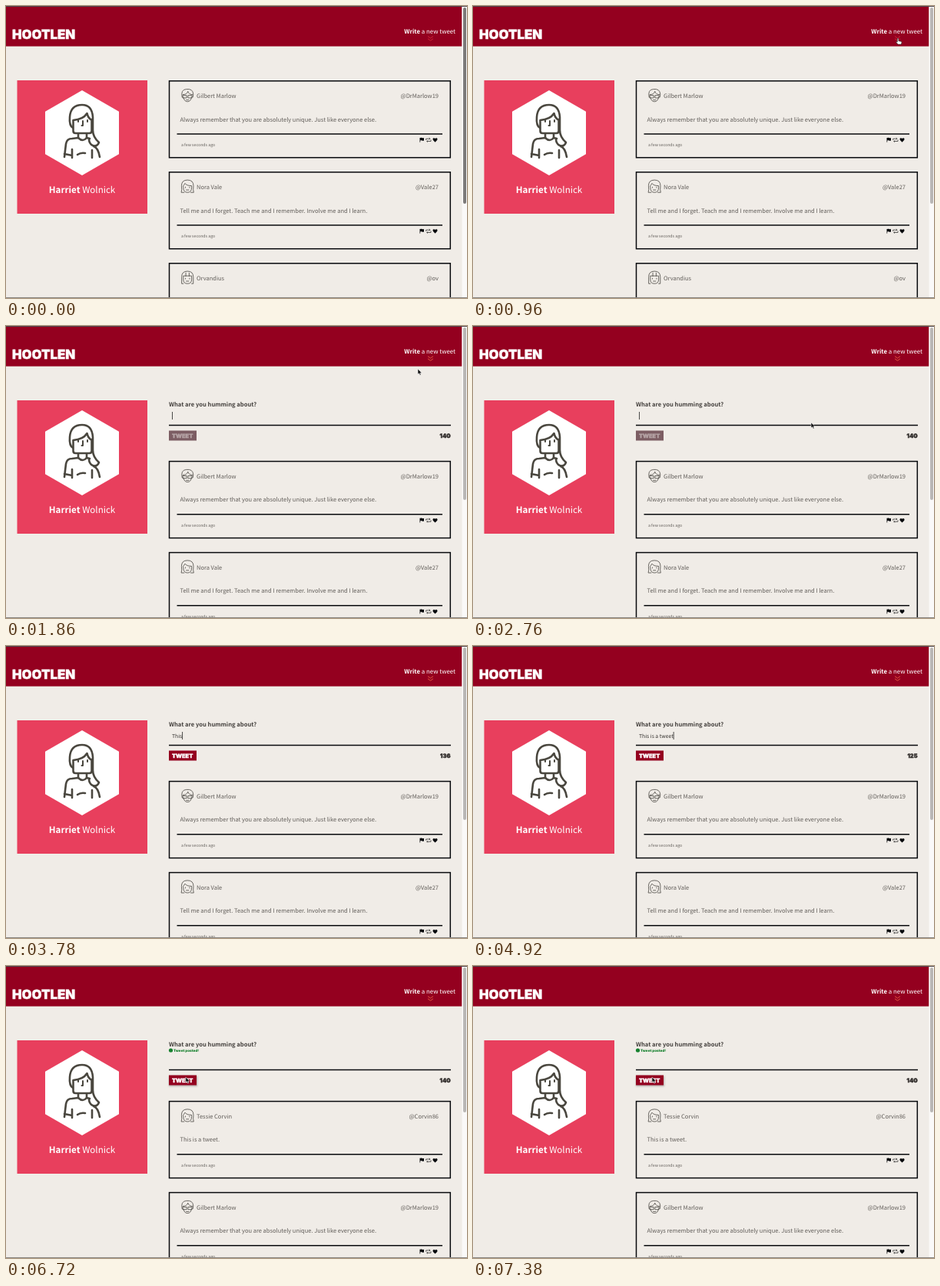
Animation, 600 px wide and 381 px high, one loop 7440 ms. Source, as an HTML page:

```html
<!DOCTYPE html>
<html lang="en">
<head>
<meta charset="utf-8">
<title>Posting a tweet</title>
<style>
html, body { margin: 0; width: 100%; height: 100%; overflow: hidden; background: #f0ece7; }
svg { display: block; width: 600px; height: 381px; overflow: hidden; }
text {
  font: 7.53px "Noto Sans CJK JP", "Noto Sans CJK SC", "Source Sans Pro", Lato, sans-serif;
  fill: #625e5a; text-rendering: geometricPrecision; white-space: pre;
}
.bold { font-weight: 700; }
.block { font-family: Inter, Roboto, sans-serif; font-weight: 900; stroke-width: .4; }
.end { text-anchor: end; }
.line { fill: none; stroke: #080a0d; stroke-width: 1.5; }
.face { fill: none; stroke: #4c4945; stroke-width: .75; stroke-linecap: round; stroke-linejoin: round; }
</style>
</head>
<body>
<svg viewBox="0 0 600 381">
  <rect width="593.5" height="52.600" fill="#94001f"/>
  <rect x="593.5" width="6.5" height="381" fill="#faf9f8"/>
  <rect id="thumb" x="595" y="2" width="4" rx="2"/>
  <rect width="600" height="1" fill="#514a50"/>
  <text class="block" x="8" y="42.900" style="font-size:16.8px;fill:#fff;stroke:#fff">HOOTLEN</text>
  <text class="end" x="585" y="36.100" style="font-size:7.85px;fill:#fff"><tspan class="bold">Write</tspan> a new tweet</text>
  <path id="chevrons" d="M549 39.5l3.5 2.5 3.5-2.5M549 42.7l3.5 2.5 3.5-2.5" fill="none" stroke-width="1"/>

  <rect x="14.5" y="97" width="169.5" height="174" fill="#e83f5d"/>
  <path d="M99 110l48 27.8v55.4L99 221l-48-27.8v-55.4z" fill="#fff"/>
  <g fill="none" stroke="#4a473f" stroke-width="2.6" stroke-linecap="round" stroke-linejoin="round">
    <path d="M87 159q-5-3-4-14 1-16 16-16 13 0 14 16v17q0 9 8 16-2 6-8 4-5-2-5-9"/>
    <path d="M87.500 149v14q0 3 3 3h18q3 0 3-3v-15M87.500 149q13-1 18-9 1 6 6 9M94 167v5M105 167v5"/>
    <path d="M94 149v2M106 149v2M100 150v6h-1.500" stroke-width="2"/>
    <path d="M76 197l2-17q1-7 8-7l8-1q6 6 11 0l4 1M114 183q6 2 8 14M76 193l10 2M86 187v11M112 188v10M93 194q4-3 10-2"/>
  </g>
  <text x="99" y="244.200" text-anchor="middle" style="font-size:11.6px;fill:#fff"><tspan class="bold">Harriet</tspan> Wolnick</text>

  <g id="form">
    <text class="bold" x="212" y="104.800" style="font-size:7.6px;fill:#45413e">What are you humming about?</text>
    <g id="notice">
      <circle cx="214.500" cy="110" r="2.600" fill="#16812f"/>
      <text class="block" x="218" y="111.600" style="font-size:4.6px;fill:#16812f">Tweet posted!</text>
    </g>
    <text id="draft" x="216" y="119.700" style="font-size:6.8px;fill:#35322f"></text>
    <rect id="caret" y="112" width=".8" height="10" fill="#222"/>
    <g id="controls">
      <path class="line" d="M212 129.500H579"/>
      <rect id="glow" x="212" y="137.500" width="37" height="13.500" fill="#8d8583" opacity=".6" style="filter:blur(1px)"/>
      <rect id="button" x="212" y="136.500" width="36" height="13"/>
      <text id="label" class="block" x="216" y="145.800" style="font-size:7.4px">TWEET</text>
      <text id="count" class="block end" x="578.500" y="145.500" style="font-size:7.5px;fill:#34302e;stroke:#34302e"></text>
    </g>
  </g>
  <g id="feed"></g>
  <rect y="380" width="600" height="1" fill="#8a8784"/>

  <path id="arrow" d="M0 0v7l1.700-1.400 1.100 2.500 1.300-.6-1.100-2.400h2.200z" fill="#111" stroke="#fff" stroke-width=".5"/>
  <path id="hand" d="M-.8 1q0-1 .8-1t.8 1v2.500l3.200.7q1 .3.900 1.300l-.6 2.500h-4.300l-2.500-3q.5-1 1.700 0z" fill="#fff" stroke="#222" stroke-width=".6"/>
</svg>
<script>
const LOOP = 7440, OPEN = 1620, TYPE = 3330, KEY = 104, MOVE = 5520, POST = 6660;
const MESSAGE = "This is a tweet.", LAST_KEY = TYPE + KEY * MESSAGE.length;
const el = id => document.getElementById(id);
const set = (id, attrs) => { for (const k in attrs) el(id).setAttribute(k, attrs[k]); };
const show = (id, on) => set(id, { visibility: on ? "visible" : "hidden" });
const shift = (x, y) => `translate(${x} ${y})`;

// Portraits are drawn around their own centre
const eyes = "M-2.500 .5v.8M2.500 .5v.8M-1.500 4h3";
const longHair = "M-5 1q0 6 5 6t5-6v-2q-6 0-8-3-1 2-2 3zM-4 7h-3.500q1-3 .3-8 0-7 7.200-7t7.200 7q-.7 5 .3 8H4" + eyes;
const glasses = "M-5 2q1 5.500 5 5.500T5 2M-6.500 2q-2-9 5-9.500 8-1 8.500 6l-.5 3.500M-5.500-1q5 0 6-4 1 4 5.500 4M-5.500 0h4.500v3h-4.500zM1 0h4.500v3h-4.500zM-1.500 5.500h3";
const bangs = "M-5-2v4q0 5 5 5t5-5v-4zM-5 7h-2v-8q0-7 7-7t7 7v8H5M-2-2v-4M2-2v-4" + eyes;

const posts = [
  ["Tessie Corvin", "@Corvin86", MESSAGE, longHair],
  ["Gilbert Marlow", "@DrMarlow19", "Always remember that you are absolutely unique. Just like everyone else.", glasses],
  ["Nora Vale", "@Vale27", "Tell me and I forget. Teach me and I remember. Involve me and I learn.", longHair],
  ["Orvandius", "@ov", "", bangs]
];

el("feed").innerHTML = posts.map(([name, handle, body, face], i) => `
  <g id="post${i}">
    <rect class="line" x="212.500" y=".8" width="365.800" height="100"/>
    <path class="face" transform="translate(236.200 19.700) scale(1.08)" d="${face}"/>
    <text x="248" y="22.800">${name}</text>
    <text class="end" x="563" y="22.800">${handle}</text>
    <text x="226.500" y="53.700">${body}</text>
    <path class="line" d="M222.500 70H568"/>
    <text x="228" y="86" style="font-size:5.24px">a few seconds ago</text>
    <path d="M538.500 75h.7q1.200-.7 2.400 0t2.400 0v3.600q-1.200.7-2.400 0t-2.400 0v2.200h-.7z" fill="#080a0d"/>
    <path d="M546.700 78v-1.800h5.300m-1.200-1.200 1.200 1.200-1.200 1.200M553 77.500v2h-5.300m1.200-1.200-1.200 1.200 1.200 1.200" fill="none" stroke="#222" stroke-width=".7"/>
    <path d="M558.500 80.800l-2.600-2.700q-.9-1.400 0-2.500 1.300-1.100 2.600.4 1.300-1.500 2.600-.4.9 1.100 0 2.500z" fill="#080a0d"/>
  </g>`).join("");

const track = [
  [120, 597, 2], [800, 553, 42], [1680, 554, 43], [2400, 440, 126],
  [MOVE, 440, 126], [6100, 237, 145], [6300, 237, 145], [6900, 233, 145]
];

function pointer(t) {
  const n = track.findIndex(p => p[0] > t);
  if (n < 1) return track.at(n).slice(1);
  const [t0, x0, y0] = track[n - 1], [t1, x1, y1] = track[n];
  const u = (t - t0) / (t1 - t0), e = u * u * (3 - 2 * u);
  return [x0 + (x1 - x0) * e, y0 + (y1 - y0) * e];
}

function draw(t) {
  const open = t >= OPEN, opening = open && t < OPEN + 60, posted = t >= POST;
  const drop = !open ? 0 : opening ? 69.6 : 78.8;
  const typed = posted ? 0 : Math.max(0, Math.min(MESSAGE.length, Math.floor((t - TYPE) / KEY)));
  const [x, y] = pointer(t);

  el("form").style.display = open ? "" : "none";
  // The scrollbar stays dark until the pointer leaves it
  set("thumb", {
    height: posted ? 189 : !open ? 256 : opening ? 228 : 225,
    fill: x > 593 ? "#7c7a79" : "#b9b7b5"
  });
  set("chevrons", { stroke: open ? "#e0503f" : "#cc2536" });
  posts.forEach((_, i) => set("post" + i, { transform: shift(0, 97 + drop + 119 * (i - !posted)) }));
  show("post0", posted);

  el("draft").textContent = MESSAGE.slice(0, typed);
  el("count").textContent = 140 - typed;
  show("notice", posted);
  set("controls", { transform: shift(0, posted ? 6 : 0) });

  // The caret restarts its blink with every key
  const focus = typed ? Math.min(TYPE + KEY * typed, LAST_KEY) : 1700;
  show("caret", open && t >= 1700 && !posted && (t - focus) % 1000 < 500);
  if (open) set("caret", { x: 216 + (typed ? el("draft").getComputedTextLength() : 0) });

  const visible = t >= track[0][0] && (t < TYPE + KEY || t >= MOVE);
  const link = x > 520 && y > 28 && y < 52;
  const hover = open && visible && x >= 212 && x <= 248 && y >= 136;
  const active = typed > 0 || posted;
  const ink = active ? "#fff" : "#b5a3a5";
  set("button", { fill: active ? "#94001f" : "#7c5d63" });
  set("label", { style: `font-size:7.4px;fill:${ink};stroke:${ink}` });
  show("glow", hover);
  show("arrow", visible && !link);
  show("hand", visible && link);
  set("arrow", { transform: shift(x, y) });
  set("hand", { transform: shift(x, y) });
}

function frame() {
  draw(performance.now() % LOOP);
  requestAnimationFrame(frame);
}
frame();
</script>
</body>
</html>
```
